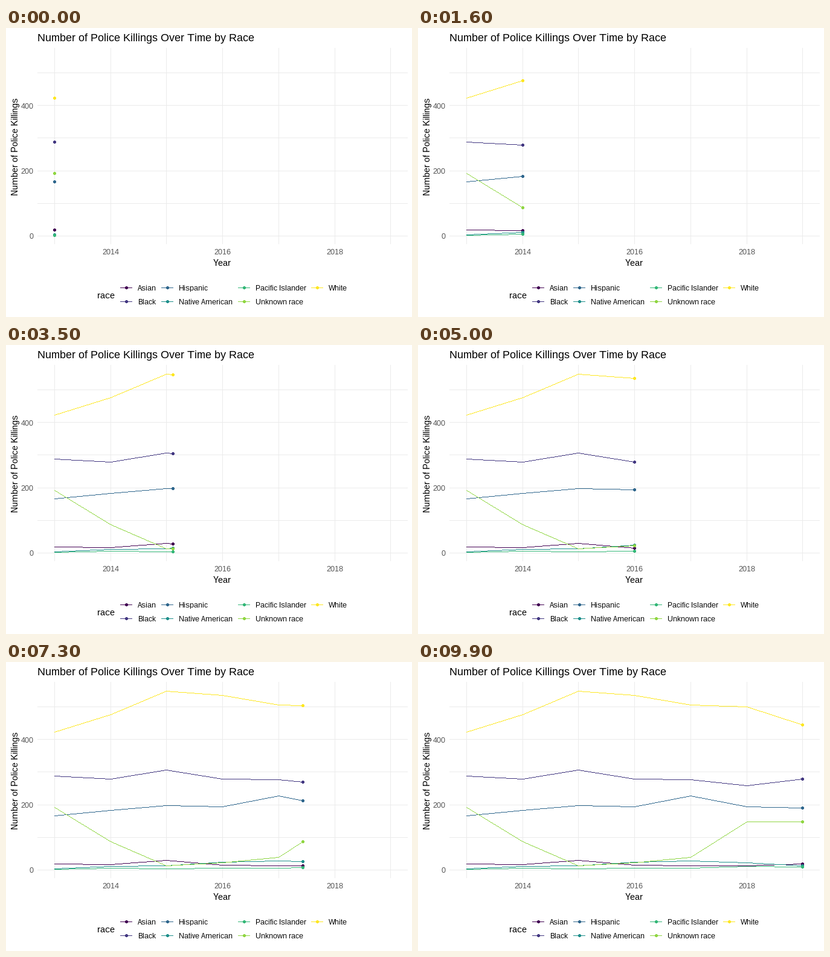
These frames come from a looping animation (672x480 px, 10 s). A matplotlib script:

```python
import numpy as np
import matplotlib.pyplot as plt
from matplotlib.animation import FuncAnimation
from matplotlib.colors import to_rgba

W, H, DPI = 672, 480, 96

# Whole-pixel glyph advances without kerning
plt.rcParams.update({
    "font.family": "Liberation Sans",
    "text.hinting": "default",
    "text.hinting_factor": 1,
    "text.kerning_factor": 12,
})

COUNTS = {
    "Asian": [19, 17, 30, 15, 13, 13, 19],
    "Black": [288, 279, 307, 279, 277, 259, 279],
    "Hispanic": [166, 183, 198, 194, 228, 194, 190],
    "Native American": [5, 12, 14, 25, 29, 23, 14],
    "Pacific Islander": [3, 6, 5, 6, 6, 12, 10],
    "Unknown race": [192, 87, 13, 23, 40, 148, 148],
    "White": [423, 476, 548, 535, 506, 500, 445],
}
COLORS = plt.cm.viridis(np.linspace(0, 1, len(COUNTS)))
GRID = to_rgba("#EBEBEB")
YEARS = np.arange(7)                        # years since 2013
YEAR_FRAMES = [0, 16, 33, 50, 66, 82, 99]   # frame on which each year is reached

# 5 x 5 dot with its corners cut off
DY, DX = np.mgrid[-2:3, -2:3]
DISC = abs(DX) + abs(DY) < 4


def x_px(year):
    return np.floor(80.4 + 92.72 * np.asarray(year)).astype(int)


def y_px(count):
    return np.floor(345.78 - 0.5427 * np.asarray(count)).astype(int)


def dot(canvas, x, y, color):
    canvas[y + DY[DISC], x + DX[DISC]] = color


def line(canvas, xs, ys, color):
    cols = np.arange(xs[0], xs[-1] + 1)
    rows = np.rint(np.interp(cols, xs, ys)).astype(int)
    canvas[rows, cols] = color


fig = plt.figure(figsize=(W / DPI, H / DPI), dpi=DPI, facecolor="white")
ax = fig.add_axes([0, 0, 1, 1])
ax.axis("off")


def label(x, y, text, size, color="black", **kw):
    ax.text(x, y, text, fontsize=size * 72 / DPI, color=color,
            va="baseline", **kw)


# Hard-edged one-pixel graphics are drawn into a raster layer
base = np.ones((H, W, 4))

# Grid and axis labels
for k in YEARS:
    base[33:359, x_px(k)] = GRID
    if k % 2:
        label(x_px(k) + 0.5, 376, str(2013 + k), 12, "#4D4D4D", ha="center")
for v in range(0, 600, 100):
    base[y_px(v), 52:665] = GRID
    if v in (0, 200, 400):
        label(45.5, y_px(v) + 5.5, str(v), 12, "#4D4D4D", ha="right")

label(52, 22, "Number of Police Killings Over Time by Race", 18)
label(358, 395, "Year", 15, ha="center")
label(20, 196.5, "Number of Police Killings", 15, ha="center",
      rotation=90, rotation_mode="anchor")

# Legend, filled column by column
label(150.5, 449, "race", 15)
for i, (name, color) in enumerate(zip(COUNTS, COLORS)):
    x, y = (199, 267, 394, 515)[i // 2], (431, 454)[i % 2]
    line(base, [x - 10, x + 9], [y, y], color)
    dot(base, x, y, color)
    label(x + 18.6, y + 5, name, 12)

layer = ax.imshow(base, extent=(0, W, H, 0), interpolation="nearest",
                  aspect="auto")
ax.set(xlim=(0, W), ylim=(H, 0))


def update(frame):
    now = np.interp(frame, YEAR_FRAMES, YEARS)
    past = YEARS[YEARS < now]
    xs = x_px(np.append(past, now))
    canvas = base.copy()
    heads = []
    for counts, color in zip(COUNTS.values(), COLORS):
        current = np.interp(now, YEARS, counts)
        ys = y_px(np.append(counts[:len(past)], current))
        line(canvas, xs, ys, color)
        heads.append((xs[-1], ys[-1], color))
    for head in heads:
        dot(canvas, *head)
    layer.set_data(canvas)
    return [layer]


anim = FuncAnimation(fig, update, frames=100, interval=100, repeat=True,
                     repeat_delay=0)
plt.show()
```
